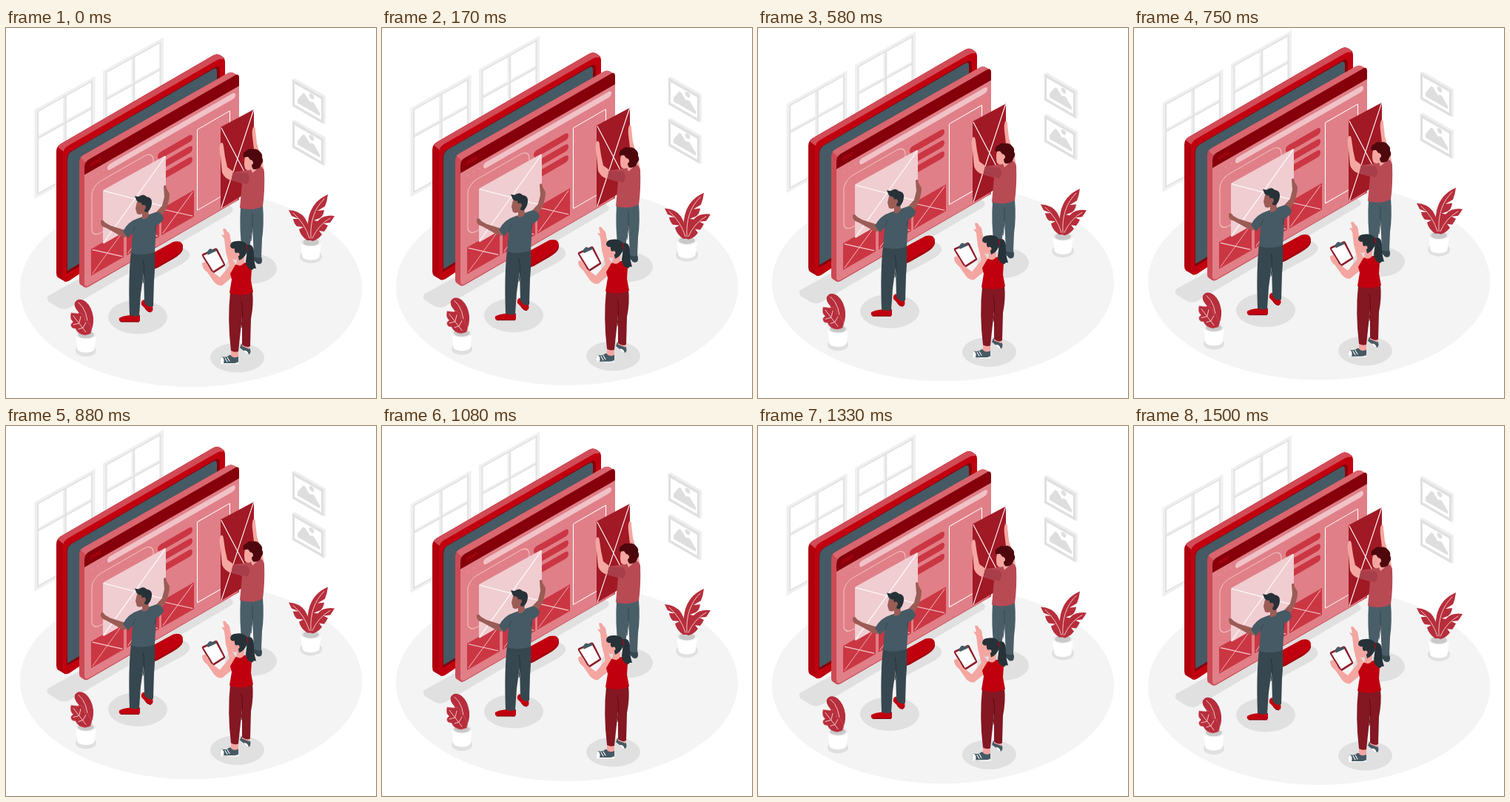
An HTML page for the animation above (1540 ms loop, 500 by 500 pixels).

```html
<!DOCTYPE html>
<html lang="en">
<head>
<meta charset="utf-8">
<style>
  html, body { margin: 0; width: 100%; height: 100%; overflow: hidden; background: #fff }
  svg { display: block; width: 100vw; height: 100vh }
  .line { fill: none; stroke: #fff; stroke-width: 1.1; stroke-linecap: round; stroke-linejoin: round }
  .vein { fill: none; stroke: #f3c3c6; stroke-width: 1; stroke-linecap: round }
  .shadow { fill: #e0e0e0 }
  .red { fill: #c1000f }
  .slate { fill: #455a64 }
  .navy { fill: #37474f }
  .ink { fill: #263238 }
  .leaf { fill: #b72e3b }
  .brown { fill: #9b5c55 }
  .skin { fill: #f4a6a1 }
  .maroon { fill: #85000b }
  .wine { fill: #831722 }
  .rose { fill: #b84a54 }
  .card { fill: #cb3643 }
</style>
</head>
<body>
<svg viewBox="0 0 500 500">
  <defs>
    <g id="window" fill="none">
      <path d="M2.5 2.5H79.500V118H2.500ZM41 3V118M3 40H79" stroke="#f0f0f0" stroke-width="5"/>
      <path d="M4.500 4.500H77.500V116H4.500ZM42 5V116M5 41H77" stroke="#e2e2e2" stroke-width="2"/>
    </g>
    <g id="picture">
      <path d="M0 0L3 -3.500H45V34L42 36Z" fill="#efefef"/>
      <path d="M0 0H42V36H0Z" fill="#e0e0e0"/>
      <path d="M3 4H39V32H3Z" fill="#fff"/>
      <path d="M7 28V23L14 11Q16 8 18 11L24 17Q26 14 29 15L37 24V28Z" fill="#dedede"/>
      <circle cx="26" cy="8" r="3.300" fill="#dedede"/>
    </g>
    <g id="card">
      <rect width="44" height="36" class="card"/>
      <path d="M2 2L42 34M42 2L2 34" class="vein"/>
    </g>
    <g id="pot">
      <path d="M-14 0L-11.500 20C-9 26 9 26 11.500 20L14 0Z" fill="#fff"/>
      <ellipse rx="14" ry="6.500" fill="#f0f0f0"/>
      <ellipse cy=".5" rx="11" ry="4.800" fill="#c9c9c9"/>
    </g>
  </defs>

  <g id="scene">
    <ellipse cx="250" cy="352" rx="231" ry="133" fill="#f4f4f4"/>
    <use href="#window" transform="matrix(1 -.555 0 1 38.500 110.500)"/>
    <use href="#window" transform="matrix(1 -.555 0 1 131 58)"/>
    <use href="#picture" transform="matrix(1 .575 0 1 387 69.500)"/>
    <use href="#picture" transform="matrix(1 .575 0 1 387 125.500)"/>

    <g class="shadow">
      <path d="M57 362L290 232L305 242Q309 246 304 250L86 378Q79 382 71 378L58 370Q54 366 57 362Z"/>
      <path d="M180 335L235 296Q250 300 248 309Q246 315 232 322L200 339Z"/>
      <ellipse cx="178" cy="390.500" rx="40" ry="23"/>
      <ellipse cx="331" cy="325" rx="35" ry="20.500"/>
      <ellipse cx="312.500" cy="445.500" rx="36.500" ry="20"/>
      <ellipse cx="412" cy="309" rx="15" ry="9"/>
      <ellipse cx="108" cy="436" rx="14" ry="8"/>
    </g>

    <!-- monitor -->
    <path d="M180 316L226 290Q239 288 239 297V299Q238 305 226 312L205 324Q193 330 180 324Z" fill="#a3000d"/>
    <path d="M180 314L226 289Q239 286 239 296Q238 302 226 309L205 321Q193 327 180 321Z" class="red"/>
    <path d="M68 167Q68 160 74 156.500L280 37Q285 34 290 37L294 40Q296 42 296 47V200L86 341Q81 344 77 341L70 337Q68 335 68 331Z" fill="#b0000e"/>
    <path d="M70 161Q71 158 74 156.500L280 37Q285 34 290 37L295 41L84 163L78 167Z" fill="#d14c57"/>
    <path d="M77 171Q77 163 84 159L285 43.500Q296 38 296 50V200L86 341Q77 346 77 337Z" class="red"/>
    <path d="M82 178Q82 170 88 166.500L282 53Q289 49 289 57V210L82 332Z" class="maroon"/>
    <path d="M83 178Q83 170 89 166.500L280 55.500Q285 53 285 59V208L83 328Z" class="slate"/>

    <!-- page -->
    <path d="M99 181Q99 175 105 171.500L300 61Q304 59 308 61L313 64Q315 66 315 70V232L111 350Q107 352 104 349L101 347Q99 346 99 343Z" fill="#cc4a55"/>
    <path d="M100.500 175Q102 173 105 171.500L300 61Q304 59 308 61L314 65L108 182Z" fill="#d9666f"/>
    <g transform="matrix(1 -.575 0 1 106 0)">
      <rect y="181" width="209" height="170.500" rx="6" fill="#e07f87"/>
      <path d="M0 198.500V188Q0 181 6 181H203Q209 181 209 188V198.500Z" class="maroon"/>
      <g fill="none" stroke="#c1000f">
        <circle cx="10" cy="190" r="1.800"/><circle cx="15" cy="190" r="1.800"/><circle cx="20" cy="190" r="1.800"/>
      </g>
      <rect x="31" y="203.500" width="173" height="8" rx="4" fill="#f0c3c8"/>
      <path d="M9 207h.1M18 207h.1M26 207h.1" class="vein"/>
      <rect x="10" y="219.500" width="83" height="70" rx="12" class="vein"/>
      <g class="card">
        <rect x="99" y="226.500" width="47" height="9.500" rx="4.500"/>
        <rect x="99" y="241.500" width="47" height="9.500" rx="4.500"/>
        <rect x="99" y="256.500" width="47" height="9.500" rx="4.500"/>
      </g>
      <use href="#card" x="9" y="304"/>
      <use href="#card" x="57" y="304"/>
      <use href="#card" x="104" y="304"/>
      <rect x="152.500" y="225" width="44" height="109" rx="1" class="line"/>
    </g>
    <path d="M131 221Q131 219 133 218L214 173Q216 172 216 174V243L133 291Q131 292 131 290Z" fill="#f0cdd1"/>
    <path d="M132 220L216 242M215 174L132 290" class="line"/>
    <path d="M290 134L335 110V217L290 244Z" fill="#a11925"/>
    <path d="M334.500 111L291 243M291 135L334 217" class="line"/>

    <!-- man at the column -->
    <path d="M334 134Q337 132 337 138L339 156L347 183L349 195L338 197L336 172L333 147Q332 139 334 134Z" class="skin"/>
    <path d="M334 305L345 309Q347 314 345 318Q340 321 337 316L333 312Z" class="navy"/>
    <path d="M317 241L347 239Q349 265 346 285L345 310Q340 312 335 309L333 268L330 291L328 307L319 301Q315 272 317 241Z" fill="#4a5e68"/>
    <path d="M333 250V270L331 288" fill="none" stroke="#37474f"/>
    <path d="M322 193L338 187Q347 185 349 194Q350 220 347 241Q332 248 316 243L319 210L305 206L304 195Z" class="rose"/>
    <path d="M304 195L326 196Q332 203 326 211L305 206Z" fill="#a73e49"/>
    <path d="M290 156Q293 153 294 160L296 174L299 188L307 194L304 206Q295 203 292 195L290 174Q287 161 290 156Z" class="skin"/>
    <path d="M323 174Q321 183 323 190Q327 194 331 191L333 196L340 190L339 174Z" class="skin"/>
    <path d="M321 175Q319 168 325 166Q328 162 333 164Q339 162 343 167Q347 170 346 175Q349 180 345 184Q344 190 337 191Q332 192 332 184Q335 178 330 178L327 174Z" fill="#4e070d"/>
    <circle cx="331" cy="182" r="3" class="skin"/>

    <!-- man at the panel -->
    <g class="red">
      <path d="M168 388H181V396Q177 398 174 397H155Q152 396 153 392Q157 389 168 388Z"/>
      <path d="M186 367L198 376Q200 383 195 384Q191 384 188 379L183 374Q182 369 186 367Z"/>
    </g>
    <path d="M155 397H180M188 379Q191 384 196 384" fill="none" stroke="#78000a"/>
    <path d="M169 302L201 300Q202 320 200 342L199 376Q192 379 187 371L186 331L182 360L180 389Q173 391 167 388Q165 337 169 302Z" class="navy"/>
    <path d="M185 314Q188 326 185 345" fill="none" stroke="#263238"/>
    <path d="M128 261Q130 257 134 263L141 267L160 273L172 262L176 273L161 283Q153 281 146 276L135 270Q127 268 128 261Z" class="brown"/>
    <path d="M213 214Q216 210 217 217L221 224Q221 233 217 243L211 254L202 250L211 240L214 228Z" class="brown"/>
    <path d="M179 257L202 249Q208 247 213 256Q213 262 203 267Q202 287 201 303Q185 309 169 304L171 277L165 284L158 275Q165 261 179 257Z" class="slate"/>
    <path d="M171 277L175 268M203 267L201 275" fill="none" stroke="#37474f"/>
    <path d="M177 235L175 244L177 251Q181 253 184 251L184 258Q191 259 193 253L191 236Z" class="brown"/>
    <path d="M174 227L179 228Q186 223 190 228Q198 229 197 237Q196 245 191 249L187 248L188 241Q183 241 183 236Q177 236 176 232Z" class="ink"/>
    <circle cx="186" cy="242" r="3" class="brown"/>

    <!-- woman -->
    <path d="M291 444Q298 446 302 442H314V451Q309 454 303 453Q296 455 290 453Q288 449 291 444ZM318 427L329 432Q332 437 329 441Q324 441 321 436L316 432Z" class="slate"/>
    <path d="M291 444Q296 446 294 453L290 453Q288 449 291 444ZM321 436Q326 435 328 441Q324 441 321 436Z" fill="#fff"/>
    <path d="M296 446L299 451M299 445L302 450M290 453.500H314" class="line"/>
    <path d="M304 435H314V444Q308 447 304 443ZM319 424L329 429V434L319 430Z" class="skin"/>
    <path d="M303 357L333 356Q335 373 331 393L330 430Q325 433 319 428L319 390L314 437Q309 439 304 436Q299 394 303 357Z" class="wine"/>
    <path d="M318 369Q321 382 318 405" fill="none" stroke="#5d0b15"/>
    <path d="M293 272Q296 269 299 275Q303 277 303 284L305 292L304 310L311 320L303 326L297 302L295 285L291 279L295 280Z" class="skin"/>
    <path d="M265 308Q264 306 266 305L283 297.500Q285 297 286 299L296 319Q297 321 295 322L281 331Q279 332 278 330Z" fill="#8d1c28"/>
    <path d="M267 307.500L283.500 300L294 319.500L280 328.500Z" fill="#fff"/>
    <path d="M271 303.500L274 299.500Q277 297 279 300L284 298.500L285 301L273 306.500Z" class="slate"/>
    <path d="M265 318Q269 314 272 319L277 328L289 337L304 319L313 324L303 339L292 348Q286 349 281 343L272 330Q265 325 265 318Z" class="skin"/>
    <path d="M310 320L324 317Q332 319 332 326L331 341L334 357Q318 364 302 358L305 340L303 332Z" class="red"/>
    <path d="M304 294Q302 304 304 311Q308 315 312 312L311 319Q317 324 322 317L322 297Z" class="skin"/>
    <path d="M303 295Q303 288 312 288Q321 287 326 293Q334 291 335 302Q334 312 338 325Q334 324 333 327Q324 325 324 315L326 301Q323 311 315 314L313 305Q308 304 309 298Q305 299 303 295Z" class="ink"/>
    <path d="M325 293L327 301" fill="none" stroke="#c1000f" stroke-width="1.200"/>
    <circle cx="313" cy="306" r="2.500" class="skin"/>

    <!-- plants -->
    <use href="#pot" x="412" y="289"/>
    <g class="leaf">
      <path d="M410 286Q406 270 409 256Q414 234 435 225Q434 234 431 241L421 247L430 246Q429 254 424 257L416 260L422 261Q414 272 414 286Z"/>
      <path d="M407 287Q398 281 396 272L402 269L393 268Q389 264 388 258L396 258L386 254L382 246Q397 247 404 257Q411 268 412 287Z"/>
      <path d="M412 287Q413 271 422 260Q430 252 444 254Q441 259 438 263L429 264L435 267Q433 271 430 275L423 274L427 279Q422 286 414 288Z"/>
    </g>
    <path d="M412 284Q410 250 430 231M410 284Q404 264 388 250M414 284Q422 266 438 257" class="vein"/>

    <use href="#pot" x="108" y="414"/>
    <path d="M107 414Q106 399 98 384Q91 376 93 371Q98 363 108 370Q116 377 118 391Q119 405 112 414Z" class="leaf"/>
    <path d="M98 371Q111 381 111 409" class="vein"/>
    <path d="M107 415Q97 414 94 406Q87 406 88 400L91 397Q86 394 88 385L97 386Q103 383 106 390V395Q112 394 112 400Q118 404 114 413Z" class="leaf" stroke="#cf5963" stroke-width=".6"/>
    <path d="M91 389L108 411M99 399L91 401M104 405L98 407M99 398L101 390M104 405L108 398" class="vein"/>
  </g>
</svg>
<script>
  const scene = document.getElementById('scene');
  const LOOP = 1540, HALF = 750, LEAD = 25, RISE = 10;

  // Height of the linear float: up for one half period, down for the next.
  const height = t => RISE * (1 - Math.abs(1 - (t + LEAD) / HALF % 2));

  function draw() {
    const lift = height(performance.now() % LOOP) - height(0);
    scene.setAttribute('transform', `translate(0 ${-lift.toFixed(3)})`);
    requestAnimationFrame(draw);
  }
  draw();
</script>
</body>
</html>
```
